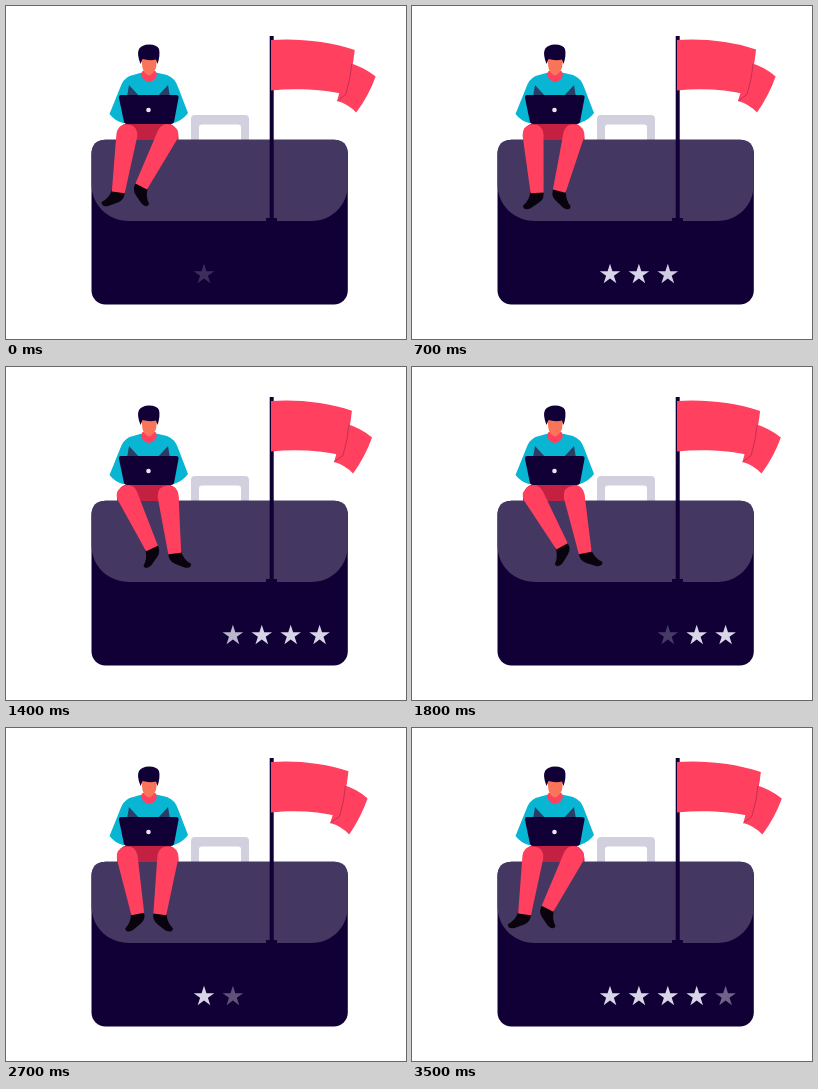
An HTML page that plays this animation: 400 px wide and 333 px high, repeating every 3600 ms.

```html
<!DOCTYPE html>
<html lang="en">
<head>
<meta charset="utf-8">
<title>Briefcase</title>
<style>
  html, body { margin: 0; width: 100%; height: 100%; overflow: hidden; background: #fff; }
  svg { display: block; width: 100vw; height: 100vh; }
  .navy { fill: #110036; }
  .red { fill: #ff405f; }
  .teal { fill: #08b5d2; }
  .shoe { fill: #08030c; }
</style>
</head>
<body>
<svg viewBox="0 0 400 333">
  <defs>
    <g id="leg">
      <path class="shoe" d="M114.500 185H127Q129 193 122 197L113 202Q106 204 106 199Q113 194 114.500 185Z"/>
      <path class="red" d="M110.500 129Q111 118.500 121 118.500Q131 118.500 131.500 129L127.500 187H114.500Z"/>
    </g>
  </defs>

  <!-- briefcase -->
  <path fill="#d2d0de" fill-rule="evenodd" d="M185 134V113Q185 109 189 109H239Q243 109 243 113V134H235V121Q235 118.500 232 118.500H196Q193 118.500 193 121V134Z"/>
  <rect class="navy" x="85.500" y="133.700" width="256.300" height="164.900" rx="14"/>
  <path fill="#443761" d="M99.500 133.700H328Q341.800 133.700 341.800 148V178C341.800 199 326 215 305 215H123C102 215 85.500 199 85.500 178V148Q85.500 133.700 99.500 133.700Z"/>
  <g id="stars" fill="#d8d5e8"></g>

  <!-- flag -->
  <path class="navy" d="M263.700 30H267.700V212H271V215H260V212H263.700Z"/>
  <path id="tail" class="red"/>
  <path id="cloth" class="red"/>
  <path id="fold" fill="none" stroke="#b52c52" stroke-width=".8"/>

  <!-- worker -->
  <path fill="#c42042" d="M111 131Q112 117 124 117H160Q171 118 172.500 131V134H111Z"/>
  <g id="left"><use href="#leg"/></g>
  <g id="right"><use href="#leg" transform="matrix(-1 0 0 1 283 0)"/></g>
  <path class="teal" d="M136 66.500L123.500 70Q117 73 114 82L103.500 108Q109 115 117 117H168Q177 114 182 107L172 81Q169 72 161 69L150 66.500Z"/>
  <path fill="#2b3d66" d="M123 79L134 91H121ZM162 79L164 91H151Z"/>
  <path class="red" d="M136.500 65H149.500L151 69Q149 75 143 76Q137 75 135 69Z"/>
  <path fill="#fa7459" d="M135 50H151.500L150 62Q147.500 68 143 69.500Q138 68 136.500 62Z"/>
  <path class="navy" d="M134.500 58Q130.500 48 133 43Q136 38.500 143 38.500Q151 38.500 153 43Q154.500 49 151.500 58L150 53.500Q143 55 136.500 53Z"/>
  <path class="navy" d="M115 89H170Q173 89 172.500 92L168 116Q167.500 118 165 118H121Q118.500 118 118 116L113 92Q112.500 89 115 89Z"/>
  <circle cx="142.500" cy="104" r="2.300" fill="#e9e7f2"/>
</svg>
<script>
const LOOP = 3600, STEP = 100, STAR_CYCLE = 2400;
const $ = id => document.getElementById(id);
const clamp = v => Math.max(0, Math.min(1, v));

// Time and reach of the cloth: 0 is pulled in, 1 is fully stretched.
const wind = [[0, .97], [700, .45], [1100, .15], [1620, 1], [1800, .9],
              [2300, 0], [2700, .27], [3000, .75], [3400, 1], [3600, .97]];

function starPoints(cx, cy) {
  return Array.from({ length: 10 }, (_, i) => {
    const r = i % 2 ? 4.1 : 10.8, a = i * Math.PI / 5;
    return [cx + r * Math.sin(a), cy - r * Math.cos(a)].map(v => v.toFixed(2));
  }).join(' ');
}

const stars = Array.from({ length: 5 }, (_, i) => {
  const star = document.createElementNS('http://www.w3.org/2000/svg', 'polygon');
  star.setAttribute('points', starPoints(198 + i * 28.9, 268.5));
  return $('stars').appendChild(star);
});

function starOpacity(t, i) {
  const shown = time => clamp((time + 52 - i * 260) / 240);
  const hidden = clamp((t - 1105 - i * 260) / 240);
  return Math.max(shown(t) * (1 - hidden), shown(t - STAR_CYCLE));
}

function reach(t) {
  const i = wind.findIndex(([time]) => time > t);
  const [t0, a] = wind[i - 1], [t1, b] = wind[i];
  const u = (t - t0) / (t1 - t0);
  const eased = u * u * (3 - 2 * u);
  return a + (b - a) * (u + eased) / 2;
}

function drawFlag(w) {
  const x = 340 + 9 * w, tip = 358.5 + 11.5 * w, low = 340.5 + 10 * w;
  const y = 43 + w, edge = x - 9;
  $('cloth').setAttribute('d',
    `M265 34C${288 + 2 * w} 32 ${318 + 5 * w} 35 ${x} ${y}Q${x - 2} 64 ${edge} 88.500C${edge - 22} 83.500 290 82 265 84.500Z`);
  $('tail').setAttribute('d',
    `M${x - 5} 57Q${x + 9} 61 ${tip} 70.500Q${tip - 7} 90 ${low} 106.500Q${low - 8} 98 ${low - 19} 95L${edge - 6} 85Z`);
  $('fold').setAttribute('d', `M${x - 3} 58Q${x - 4} 72 ${edge} 88.500L${low - 19} 95`);
}

function draw(t) {
  const swing = Math.cos(2 * Math.PI * t / LOOP);
  $('left').setAttribute('transform', `rotate(${-10.5 + 19 * swing} 121 128)`);
  $('right').setAttribute('transform', `rotate(${8 + 19 * swing} 162 128)`);
  stars.forEach((star, i) => star.setAttribute('opacity', starOpacity(t, i)));
  drawFlag(reach(t));
}

function tick() {
  const t = performance.now() % LOOP;
  draw(Math.floor(t / STEP) * STEP);
  requestAnimationFrame(tick);
}
tick();
</script>
</body>
</html>
```
